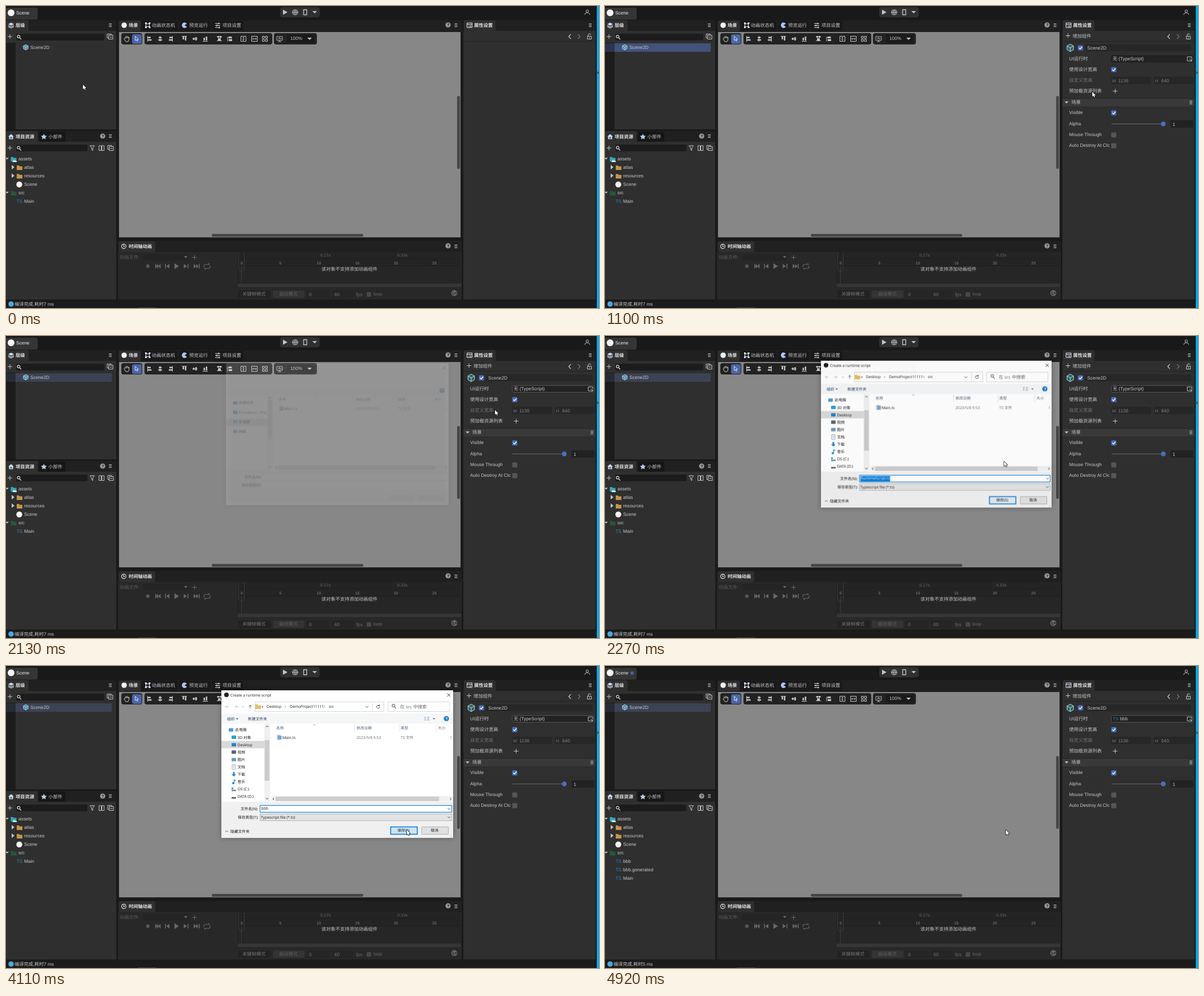
Animation, 1049 px wide and 534 px high, one loop 5910 ms. Source, as an HTML page with a canvas:

```html
<!DOCTYPE html>
<html lang="zh">
<head>
<meta charset="utf-8">
<style>
html,body{margin:0;width:100%;height:100%;overflow:hidden;background:#191919}
canvas{display:block}
</style>
</head>
<body>
<canvas id="stage" width="1049" height="534"></canvas>
<script>
const LOOP = 5910, TICK = 78.6;
const UI = '"Liberation Sans","Noto Sans CJK SC","Noto Sans CJK",sans-serif';
const WIN = '"Open Sans","Noto Sans CJK SC","Noto Sans CJK",sans-serif';
const PANEL = '#2f2f2f', DARK = '#1c1c1c', TXT = '#c8c8c8', ICON = '#c4c4c4';
const screen2d = document.getElementById('stage').getContext('2d');
const sheet = document.createElement('canvas');
sheet.width = 1049; sheet.height = 534;
const sheet2d = sheet.getContext('2d');
let g = screen2d;

// drawing helpers
function box(x, y, w, h, color, r = 0) {
  g.fillStyle = color;
  g.beginPath(); g.roundRect(x, y, w, h, r); g.fill();
}
function frame(x, y, w, h, color, lw = 1, r = 0) {
  g.strokeStyle = color; g.lineWidth = lw;
  g.beginPath(); g.roundRect(x + .5, y + .5, w - 1, h - 1, r); g.stroke();
}
function dot(x, y, r, color) {
  g.fillStyle = color;
  g.beginPath(); g.arc(x, y, r, 0, 7); g.fill();
}
function fill(d, color = ICON) { g.fillStyle = color; g.fill(new Path2D(d)); }
function line(d, color = ICON, lw = 1) {
  g.strokeStyle = color; g.lineWidth = lw; g.stroke(new Path2D(d));
}
function text(s, x, y, color = TXT, size = 8.25, family = UI, weight = '') {
  g.font = `${weight} ${size}px ${family}`;
  g.fillStyle = color;
  g.textRendering = 'geometricPrecision';
  g.fillText(s, x, y + size * .36);
}
const bold = (s, x, y, color = '#e6e6e6') => text(s, x, y, color, 8.25, UI, 'bold');
const win = (s, x, y, color = '#1a1a1a', size = 6.75) => text(s, x, y, color, size, WIN);

// small icons
const menu = (x, y) => line(`M${x - 2.5} ${y - 2.5}h5m-5 2.5h5m-5 2.5h5`);
const plus = (x, y, c = ICON) => line(`M${x - 4} ${y}h8m-4 -4v8`, c);
const down = (x, y, c = ICON, s = 3.5) => fill(`M${x - s} ${y - s / 2}h${2 * s}l${-s} ${s}Z`, c);
const right = (x, y) => fill(`M${x - 2} ${y - 4}l5 4l-5 4Z`);
const lens = (x, y, c = '#ddd') => line(`M${x + 1} ${y + 1}l3 3M${x - 3} ${y - 1}a2.4 2.4 0 1 0 4.8 0a2.4 2.4 0 1 0 -4.8 0`, c, 1.2);
const stack = (x, y) => line(`M${x - 3} ${y + 2.5}h-2v-7h7v2M${x - 2.5} ${y - 2.5}h7.5v7h-7.5zM${x - 1} ${y + 1}h4.5`);
function help(x, y, c = '#9a9a9a', ink = '#222') {
  dot(x, y, 4.6, c);
  text('?', x - 2.1, y, ink, 7.5, UI, 'bold');
}
function folder(x, y, c) {
  fill(`M${x} ${y - 4}h4l1 1.5h5v6.5h-10z`, c);
}
function cube(x, y, r, face, edge) {
  const w = r * .87, h = r / 2;
  fill(`M${x} ${y - r}l${w} ${h}v${r}l${-w} ${h}l${-w} ${-h}v${-r}Z`, face);
  line(`M${x} ${y - r}l${w} ${h}v${r}l${-w} ${h}l${-w} ${-h}v${-r}ZM${x - w} ${y - h}l${w} ${h}l${w} ${-h}M${x} ${y}v${r}`, edge, .9);
}
function check(x, y, on) {
  box(x - 4.5, y - 4.5, 9, 9, on ? '#4a70bd' : '#555', 1.5);
  if (on) line(`M${x - 2.5} ${y}l2 2l3.5 -4`, '#fff', 1.3);
}

function topBar() {
  box(0, 0, 1049, 534, '#191919');
  box(0, 3, 56, 21, '#353535', 3);
  dot(9, 12, 6, '#f4f4f4');
  text('Scene', 18, 12, '#eee');
  box(485, 2, 70, 18, '#303030', 4);
  fill('M490 6.5l8 4.5l-8 4.5Z');
  dot(511.5, 11, 5.3, ICON);
  line('M506 9.2h11M506 13h11M511.5 5.5v11M509.5 6q-2 5 0 10M513.5 6q2 5 0 10', '#303030', .8);
  g.lineJoin = 'round';
  line('M526.5 6.5h5.5v9h-5.5z', ICON, 1.4);
  down(546, 11, ICON, 4);
  line('M1026 9a2.2 2.2 0 1 0 4.4 0a2.2 2.2 0 1 0 -4.4 0M1023.8 15.5q0 -3.5 4.4 -3.5t4.4 3.5');
}

function hierarchy(t) {
  box(0, 25, 195, 193, '#202020', 3);
  box(0, 25, 40, 20, PANEL, 3);
  box(0, 44, 195, 174, PANEL);
  fill('M4 32L9 29.5L14 32L9 34.7Z', '#cfdcf3');
  line('M4 34.2L9 37L14 34.2M4 36.5L9 39L14 36.5', '#cfdcf3', 1.1);
  bold('层级', 17, 34);
  menu(184.5, 34);
  plus(7, 54);
  box(18, 49, 156, 12, DARK, 2);
  lens(23, 55);
  stack(184, 54);
  const row = t < 240 ? '' : t < 550 ? '#3a3a3a' : t < 1650 ? '#42527a' : '#3b4354';
  if (row) box(17, 66, 170, 15, row);
  box(0, 65, 17, 153, '#1c1c1c');
  if (t >= 550) box(0, 66, 17, 15, t < 1650 ? '#293450' : '#262b36');
  cube(35, 73, 4.8, '#4d86a6', '#b4dcee');
  text('Scene2D', 43, 73);
}

function assets(t) {
  box(0, 221, 195, 298, '#202020', 3);
  box(0, 221, 56, 20, PANEL, 3);
  box(58, 222, 47, 18, '#161616', 3);
  box(0, 240, 195, 279, PANEL);
  fill('M4 231l5 -4.5l5 4.5h-1.5v4.5h-7v-4.5z', '#cfdcf3');
  box(7.5, 231.5, 3, 3, '#50607e');
  bold('项目资源', 17, 231);
  fill('M67 226l1.6 3.3l3.6 .4l-2.6 2.5l.7 3.6l-3.3 -1.7l-3.3 1.7l.7 -3.6l-2.6 -2.5l3.6 -.4Z', '#b9cbf5');
  text('小部件', 75, 231);
  help(171, 230); menu(184.5, 230);
  plus(7, 251);
  box(18, 245, 126, 12, DARK, 2);
  lens(23, 251.5);
  line('M148.5 247h8l-3 4v4.5l-2 -1.5v-3z');
  line('M164.5 247h4v8.500h-4zM169.500 247h4v8.500h-4z');
  stack(185, 251);
  down(2, 270, ICON, 3);
  folder(8.5, 271, '#35a7b5');
  fill('M11 276l3 -4l2 2l1.500 -1.500l2 3.500z', '#d8f3f5');
  text('assets', 22, 270);
  ['atlas', 'resources'].forEach((s, i) => {
    const y = 285 + 15 * i;
    right(12, y);
    folder(19, y + 1, '#c3954a');
    text(s, 32, y);
  });
  dot(23.5, 315.5, 5.2, '#f4f4f4');
  text('Scene', 32, 315);
  down(2, 330, ICON, 3);
  folder(8.5, 331, '#28563a');
  text('src', 22, 330);
  const scripts = t < 4920 ? ['Main'] : ['bbb', 'bbb.generated', 'Main'];
  scripts.forEach((s, i) => {
    text('TS', 18.5, 345.5 + 15 * i, '#2487cc');
    text(s, 32, 345 + 15 * i);
  });
}

function sceneView() {
  box(198, 25, 608, 386, '#202020', 3);
  box(200, 26, 38, 19, PANEL, 3);
  [[240, 64], [306, 56], [364, 56]].forEach(([x, w]) => box(x, 26, w, 18, '#191919', 3));
  dot(209, 34, 4.8, '#eef1f8');
  bold('场景', 217, 34);
  line('M247.500 31.500h6v5h-6z', '#dfe5f2', 1.2);
  [[246, 29], [252.500, 29], [246, 36], [252.500, 36]].forEach(([x, y]) => box(x, y, 3, 3, '#dfe5f2'));
  text('动画状态机', 258, 34);
  fill('M316 34l4 -2.800a4.900 4.900 0 1 0 0 5.600z', '#a9c3f5');
  text('预览运行', 324, 34);
  line('M370 31h9M370 34.500h9M370 38h9M376 29.500v3M373 33v3M377 36.500v3', '#dfe5f2', 1.1);
  text('项目设置', 383, 34);
  help(782, 33.5); menu(796, 34);
  box(200, 46, 604, 363, '#878787');
  box(798, 159, 5, 129, '#474747', 2.5);
  box(364, 403, 268, 5, '#474747', 2.5);

  [[204, 37], [245, 226], [474, 76]].forEach(([x, w]) => box(x, 48, w, 20, '#222', 4));
  line('M210 60l-1.500 -2.500M210 60l2 3h4l1.500 -3v-5M210.500 58v-3.500M212.500 57v-4M214.500 57v-4M216.300 57v-3');
  box(223, 50, 17, 17, '#4a66a8', 3);
  line('M228.500 53.500v7.500l2 -1.700l1.500 3l1.200 -.6l-1.300 -2.800h2.600z', '#e8edf8', .9);
  [0, 1, 2].forEach(i => {
    const x = 254 + i * 18.500, y = [53, 57.500, 62][i], k = [0, 1, 2][i];
    line(`M${x - 3.500 + k * 3.500} 53v10`);
    box(x - 3 + k * (i > 1 ? .5 : .8), 54.500, 5, 2.500, ICON);
    box(x - 3 + k * (i > 1 ? 0 : 0), 58.800, 6.500, 2.500, ICON);
    const c = 315.500 + i * 18.500;
    line(`M${c - 4.500} ${y + .5}h9`);
    box(c - 3, i === 2 ? 56 : i ? 56 : 54, 2.500, i === 1 ? 4 : 5, ICON);
    box(c + 1, i === 2 ? 54 : i ? 55 : 54, 2.500, i === 1 ? 6 : 7, ICON);
  });
  [306, 362.500, 409].forEach(x => x < 400 && line(`M${x - 3.500} 53v0`));
  line('M373 54.500h9M373 61.500h9M392 54.500v8');
  box(374, 53, 3, 3, ICON); box(378, 53, 3, 3, ICON); box(375, 57, 5, 4, ICON);
  box(393.500, 54, 6, 3, ICON); box(394, 58.500, 6, 3.500, ICON);
  line('M415.500 53.500h9v9h-9zM420 55v6M418.500 56.500l1.500 -1.500l1.500 1.500M418.500 59.500l1.500 1.500l1.500 -1.500');
  line('M434.500 53.500h10v9h-10zM436 58h7M437.500 56.500l-1.500 1.500l1.500 1.500M441.500 56.500l1.500 1.500l-1.500 1.500');
  line('M453.500 53.500h3.500v3.500h-3.500zM459 53.500h3.500v3.500h-3.500zM453.500 59h3.500v3.500h-3.500zM459 59h3.500v3.500h-3.500z');
  line('M479 54h10v6.500h-10zM484 60.500v2.500M481 63h6M481 57.500h2l1 -2l1 3l1 -1h1.500', ICON, .9);
  box(497, 51, 49, 14, '#1b1b1b', 2);
  text('100%', 503, 57.5);
  down(537, 58, ICON, 4);
}

function timeline() {
  const dim = '#686868', ink = '#5c5c5c';
  box(198, 415, 608, 104, '#202020', 3);
  box(200, 416, 64, 19, PANEL, 3);
  line('M204.500 425a3.900 3.900 0 1 0 7.800 0a3.900 3.900 0 1 0 -7.800 0M208.300 422.500v3h2', '#dfe5f2', 1.1);
  bold('时间轴动画', 217, 425);
  help(782, 424); menu(796, 425);
  box(198, 435, 608, 84, '#282828');
  text('动画文件:', 201, 444, ink);
  box(243, 438, 80, 12, '#242424', 2);
  down(318, 444, dim, 3.5); plus(333.500, 444.500, dim);
  dot(251, 460, 3.2, '#555');
  fill('M264 456h1.500v8h-1.500zM269 456v8l-4 -4zM273.500 456v8l-4.500 -4zM281.500 456h1.500v8h-1.500zM289 456v8l-5.500 -4zM298 455l8 5l-8 5zM314.500 456v8l5.500 -4zM321 456h1.500v8h-1.500zM332 456v8l4.500 -4zM336.500 456v8l4 -4zM341 456h1.500v8h-1.500z', dim);
  line('M350 462v-2q0 -3 3 -3h7l-2 -2M361 459v2q0 3 -3 3h-7l2 2', dim, 1.1);
  box(410, 435, 395, 25, '#242424');
  box(410, 460, 395, 30, '#262626');
  line('M410 446.500h395M410 459.500h395M410.500 435v84', '#1e1e1e');
  text('0.17s', 556, 440, '#505050', 7.5, UI, 'bold');
  text('0.33s', 692, 440, '#505050', 7.5, UI, 'bold');
  for (let i = 0; i < 6; i++) {
    g.textAlign = 'center';
    text(i * 5, 417 + i * 68.2, 454, '#666', 7, UI, 'bold');
  }
  g.textAlign = 'left';
  line('M411.500 436v30l5 4l5 -4v-30M416.500 460v30', '#3c3c3c');
  box(410, 491, 395, 6, '#363636');
  box(198, 498, 608, 21, '#282828');
  box(411, 503, 57, 13, '#222', 2);
  box(472, 503, 56, 13, '#343434', 2);
  text('关键帧模式', 418, 509.5, '#777');
  text('曲线模式', 483, 509.5, '#5e5e5e');
  box(532, 503, 40, 13, '#252525', 2); box(577, 503, 38, 13, '#252525', 2);
  text('0', 536, 510, '#777'); text('60', 581, 510, '#777');
  text('fps', 619.5, 510, dim);
  box(638, 506, 8, 8, '#484848', 1.5);
  text('loop', 650, 509.5, dim);
  dot(793, 507.500, 5.3, '#666');
  line('M790.500 505v5h3M793 507.500h4M795.500 506l1.500 1.500l-1.500 1.500', '#222');
  text('该对象不支持添加动画组件', 558, 465.5, '#c4c4c4');
}

function inspector(t) {
  box(809, 25, 234, 494, '#202020', 3);
  box(810, 25, 56, 20, PANEL, 3);
  box(809, 44, 234, 475, PANEL);
  line('M815.500 30h9v8h-9zM815.500 32.500h9M818 35h1M820 35h3M818 37h1M820 37h3', '#dfe5f2');
  bold('属性设置', 828, 34);
  menu(1033.500, 34);
  line('M999 50l-3.500 4l3.500 4', ICON, 1.2);
  line('M1012 50l3.500 4l-3.500 4', '#777', 1.2);
  line('M1028.500 53.500h7v5h-7zM1030 53v-2q0 -2 2 -2t2.500 2M1032 55v2');
  line('M809 62.500h234', '#222');
  if (t < 550) return;
  plus(819, 52.5);
  text('增加组件', 827, 53);
  cube(823, 74, 6.6, '#2b5e66', '#c6f2f2');
  check(841, 74, true);
  box(849, 68, 188, 12, '#272727', 2);
  text('Scene2D', 853, 74.5);
  const row = (s, y, c) => text(s, 821, y, c);
  row('UI运行时', 93);
  box(895, 87, 146, 13, '#222', 2);
  if (t >= 1650) frame(895, 87, 146, 13, '#555', 1, 2);
  if (t < 4350) text('无 (TypeScript)', 898, 93);
  else { text('TS', 898.5, 93.5, '#2487cc', 7.5); text('bbb', 911, 93); }
  line('M1036 97h-6v-7h8v4M1034 93l4 4M1038 94.500v3h-3');
  row('使用设计宽高', 112);
  check(900, 112.5, true);
  row('自定义宽高', 131.5, '#747474');
  [[895, 'W', '1136'], [971, 'H', '640']].forEach(([x, s, v]) => {
    box(x, 125, 71, 13, '#272727', 2);
    text(s, x + 2, 132, '#777', 7.5);
    text(v, x + 13, 132, '#858585');
  });
  row('预加载资源列表', 150.5);
  plus(902.5, 150.5);
  box(809, 163, 234, 15, '#393939');
  line('M809 163.500h234M809 178.500h234', '#272727');
  down(816.5, 170.5);
  text('场景', 825, 170.5);
  menu(1036.500, 170.5);
  row('Visible', 188.5); check(900, 189, true);
  row('Alpha', 208);
  box(896, 208, 92, 1, '#686868');
  dot(987.5, 208.5, 4.2, '#4a70bd');
  box(1000, 202, 41, 13, '#222', 2);
  text('1', 1004, 209);
  row('Mouse Through', 227); check(900, 228);
  row('Auto Destroy At Clc', 246); check(900, 247);
}

function statusBar(t) {
  box(0, 520, 1043, 14, '#1b1b1b');
  dot(9, 527, 4.8, '#4aa9e0');
  const s = t < 4190 ? '编译完成,耗时7 ms' : t < 4920
    ? "Error: ENOENT: no such file or directory, stat 'C:\\Users\\KORU\\Desktop\\DemoProject11111\\src\\bbb.ts'"
    : '编译完成,耗时5 ms';
  text(s, 15, 527);
  box(233, 533, 33, 1, '#444');
  box(1045, 0, 4, 534, '#00a9f4');
  fill('M1046 115l3 3l-3 3z', '#274a58');
}

// save dialog, drawn at full size on its own sheet
function navTree(early) {
  const hi = early ? 152 : 139;
  box(381, hi - 6.5, 76, 13, '#d9d9d9');
  const list = early
    ? [['快速访问', '#3a8ede'], ['CloudNest - Priv', '#2d7cc6'], ['此电脑', '#4d9fd8'], ['网络', '#4d9fd8']]
    : [['此电脑', '#4d9fd8'], ['3D 对象', '#2ba3c8'], ['Desktop', '#2383d2'], ['视频', '#5d6570'], ['图片', '#6c9cbc'],
       ['文档', '#8b98a4'], ['下载', '#2383d2'], ['音乐', '#2b86d4'], ['OS (C:)', '#6d8799'], ['DATA (D:)', '#555']];
  list.forEach(([s, c], i) => {
    const x = early ? 394 : i ? 399 : 394, y = early ? 116 + 17.4 * i : 113 + 13.1 * i;
    if (s === '下载') fill(`M${x + 2.5} ${y - 4}h3v4h2.500l-4 4l-4 -4h2.500z`, c);
    else if (s === '音乐') { dot(x + 3, y + 2.5, 2, c); line(`M${x + 4.5} ${y + 2.5}v-6l3 2`, c, 1.2); }
    else if (s === '文档') { box(x + 1, y - 4, 6, 8, '#fff'); line(`M${x + 1} ${y - 4}h6v8h-6zM${x + 2.5} ${y - 1.5}h3m-3 2h3`, c, .8); }
    else if (i > 7) { box(x, y + 1, 8, 2.5, c); if (i === 8) box(x, y - 3, 3, 3, '#2a9be0'); }
    else box(x, y - 3, 8, 6, c, 1);
    win(s, x + (i || early ? 10.5 : 11.5), y);
  });
}

function dialog(t) {
  const early = t < 2195;
  g = sheet2d;
  g.clearRect(0, 0, 1049, 534);
  box(381, 43, 410, 261, '#fff');
  line('M780.500 48.500l5.500 5.500m0 -5.500l-5.500 5.500', '#222', .9);
  box(381, 84, 410, 18, '#f5f6f7');
  help(779, 93, '#1979ca', '#fff');
  if (!early) {
    dot(390, 51, 4.1, '#222');
    win('Create a runtime script', 397, 51.5);
    line('M394 72h-5.500m2.500 -2.500l-2.500 2.500l2.500 2.500M404 72h5.500m-2.500 -2.500l2.500 2.500l-2.500 2.500M418 71l2 2l2 -2', '#b5b5b5', .9);
    line('M432 75v-6m-2.500 2.500l2.500 -2.500l2.500 2.500', '#555', .9);
    frame(440, 63, 229, 18, '#d9d9d9'); frame(675, 63, 110, 18, '#d9d9d9');
    folder(441, 72, '#e8bd63');
    win('«', 452, 71.5); win('Desktop', 461, 71.5);
    win('›', 493, 71, '#555', 8); win('DemoProject11111', 502, 71.5);
    win('›', 562.5, 71, '#555', 8); win('src', 571, 71.5);
    line('M636 71l2.500 2.500l2.500 -2.500', '#444', .9);
    line('M648.500 64v16', '#e0e0e0');
    line('M660 70a2.700 2.700 0 1 0 1 2M660.500 68v2.500h-2.500', '#444', .9);
    lens(686, 71, '#777');
    win('在 src 中搜索', 697, 72, '#6a6a6a', 8.1);
    win('组织', 391, 93.5, '#1e395b'); down(409, 93.5, '#1e395b', 2.2);
    win('新建文件夹', 428, 93.5, '#1e395b');
    line('M740 90.500h3m-3 2.500h3m-3 2.500h3M745 90.500h4m-4 2.500h4m-4 2.500h4', '#8b98a8', .9);
    down(757, 93.5, '#444', 2.2);
  }
  navTree(early);
  box(457, 102, 10, 137, '#f0f0f0');
  box(457.5, early ? 111 : 131, 8.500, 72, '#cdcdcd');
  line('M459.500 108l2.300 -2l2.300 2M459.500 233.500l2.300 2l2.300 -2', '#444');
  [616, 695, 760].forEach(x => box(x, 103, 1, 14, '#e5e5e5'));
  line('M543.500 105l2 -2l2 2', '#888', .8);
  [['名称', 478], ['修改日期', 620], ['类型', 698], ['大小', 764]].forEach(([s, x]) => win(s, x, 110, '#4c607a'));
  box(479, 121.500, 6, 9, '#b9d3e6'); box(481, 123, 6.500, 7, '#7fa5c4');
  win('Main.ts', 489, 126.5);
  win('2023/5/8 9:53', 620, 126.5, '#6d6d6d');
  win('TS 文件', 698, 126.5, '#6d6d6d');
  win('1', 785, 126.5, '#6d6d6d');
  box(469, 230, 322, 9, '#f0f0f0'); box(477, 231, 289, 8, '#cdcdcd');
  line('M474 233l-2 2l2 2M785.500 233l2 2l-2 2', '#444');
  box(381, 240, 410, 64, '#f0f0f0');
  win('文件名(N):', 415, 252.5); win('保存类型(T):', 410, 267.5);
  box(449, 246, 340, 13, '#fff'); frame(449, 246, 340, 13, early ? '#ddd' : '#0078d7');
  box(449, 261, 340, 13, early ? '#fff' : '#e3e3e3');
  box(681, 285, 46, 12, t < 3700 ? '#e4e8ec' : t < 4110 ? '#e5f1fb' : '#cce4f7');
  box(735, 285, 47, 12, '#e1e1e1');
  if (!early) {
    fileName(t);
    frame(449, 261, 340, 13, '#b4b4b4');
    win('Typescript file (*.ts)', 451, 267.5);
    line('M781.500 251.500l2.300 2l2.300 -2M781.500 266.500l2.300 2l2.300 -2M388 293.500l2.500 -2.300l2.500 2.300', '#444', .9);
    frame(680, 284, 48, 14, '#0078d7', 1.5);
    frame(735, 284, 48, 14, '#adadad');
    win('保存(S)', 692.5, 291); win('取消', 751.5, 291);
    win('隐藏文件夹', 397, 292.5);
    [[788, 302], [786, 302], [788, 300]].forEach(([x, y]) => box(x, y, 1, 1, '#aaa'));
  }
  g = screen2d;
}

function fileName(t) {
  const picked = t < 2680 || t >= 4190;
  const s = t < 2680 ? 'RuntimeScript.ts' : 'bbb'.slice(0, t < 2760 ? 0 : t < 3070 ? 1 : t < 3300 ? 2 : 3);
  g.font = `6.75px ${WIN}`;
  const w = g.measureText(s).width;
  if (picked) box(451, 248, w + 1, 9.500, '#0078d7');
  win(s, 451.5, 252, picked ? '#fff' : '#1a1a1a');
  if (!picked && t < 3950) box(Math.round(452 + w), 247, 1, 10, '#000');
}

// keyframes: [tick, ...values]
const POINTER = [[0, 136, 139], [4, 82, 74], [6, 82, 74], [13, 800, 146], [14, 862, 152], [16, 868, 168], [18, 900, 130],
  [22, 924, 89], [24, 923, 87], [25, 923, 87], [26, 905, 100], [27, 865, 131], [28, 790, 178], [29, 706, 222],
  [33, 604, 248], [41, 604, 248], [43, 658, 269], [48, 709, 290]];
const WINDOW = [[25, 0, .94], [26, .02, .95], [27, .17, .96], [28, .7, .985], [29, .97, .995], [30, 1, 1],
  [52, 1, 1], [53, .92, .99], [54, .6, .976], [55, .15, .96], [56, 0, .95]];
function at(keys, n) {
  const i = keys.findIndex(k => k[0] > n);
  if (i < 0) return keys[keys.length - 1].slice(1);
  if (!i) return keys[0].slice(1);
  const a = keys[i - 1], b = keys[i], f = (n - a[0]) / (b[0] - a[0]);
  return a.slice(1).map((v, j) => v + (b[j + 1] - v) * f);
}

function pointer(t, n) {
  const [x, y] = at(POINTER, n);
  if (t >= 2590 && t < 3290) {
    if (t < 2680 || t >= 3070) line(`M${x - 2} 247.500h4m-2 0v10m-2 0h4`, '#222');
    return;
  }
  const d = `M${x} ${y}v8.200l2 -1.800l1.400 2.900l1.400 -.6l-1.300 -2.800h2.600Z`;
  line(d, '#111', 1.4);
  fill(d, '#fff');
}

function draw(now) {
  const t = now % LOOP, n = Math.floor((t + 10) / TICK);
  topBar();
  if (t >= 4350) dot(48, 12.5, 3, '#3f68a8');
  hierarchy(t); assets(t); sceneView(); timeline(); inspector(t); statusBar(t);
  const [alpha, scale] = at(WINDOW, n);
  if (alpha > 0) {
    dialog(t);
    g.save();
    g.globalAlpha = alpha;
    g.shadowColor = 'rgba(0,0,0,.35)';
    g.shadowBlur = 9;
    g.translate(586, 173.5); g.scale(scale, scale); g.translate(-586, -173.5);
    g.drawImage(sheet, 0, 0);
    g.restore();
  }
  pointer(t, n);
}

const start = performance.now();
function loop() {
  draw(performance.now() - start);
  requestAnimationFrame(loop);
}
loop();
</script>
</body>
</html>
```
